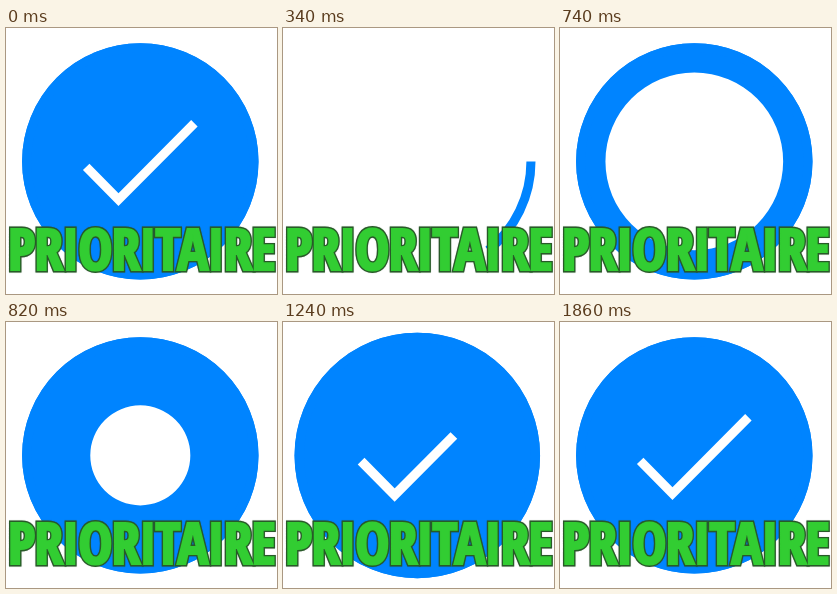
Animation of 271x266 px, one loop 1880 ms. Source, as an HTML page with a canvas:

```html
<!DOCTYPE html>
<html lang="fr">
<head>
<meta charset="utf-8">
<title>Prioritaire</title>
<style>
  html, body { margin: 0; width: 100%; height: 100%; overflow: hidden; background: #fff; }
  canvas { display: block; }
</style>
</head>
<body>
<canvas id="stage" width="271" height="266" role="img" aria-label="PRIORITAIRE"></canvas>
<script>
const ctx = document.getElementById('stage').getContext('2d');
const LOOP = 1880, STEP = 20;
const CX = 134.3, CY = 133.4, R = 118.2;
const UNIT = R / 26;               // the badge is laid out on a 52-unit square
const BLUE = '#0084ff', GREEN = '#32cd32', EDGE = '#285a28';
const LABEL = 'PRIORITAIRE';
const LABEL_W = 262.5, LABEL_H = 41.5, LABEL_X = 136.5, LABEL_Y = 221;

const clamp = (v, lo, hi) => Math.min(hi, Math.max(lo, v));

function bezier(x1, x2) {          // cubic-bezier(x1, 0, x2, 1)
  return x => {
    if (x <= 0) return 0;
    if (x >= 1) return 1;
    let lo = 0, hi = 1, u = 0.5;
    for (let i = 0; i < 30; i++) {
      u = (lo + hi) / 2;
      const v = 1 - u;
      if (3 * v * v * u * x1 + 3 * v * u * u * x2 + u * u * u < x) lo = u;
      else hi = u;
    }
    return u * u * (3 - 2 * u);
  };
}
const drawEase = bezier(0.65, 0.45);
const inOut = bezier(0.42, 0.58);
const span = (t, start, length) => clamp((t - start) / length, 0, 1);

// Pick the heavy condensed face whose proportions suit the label best.
function pickLabel() {
  const families = ['Impact', 'Noto Sans ExtraCondensed', 'Noto Sans', 'Open Sans Condensed',
    'Open Sans', 'Roboto Condensed', 'Roboto', 'Liberation Sans Narrow', 'DejaVu Sans Condensed', 'Lato'];
  const goal = LABEL_W / LABEL_H;
  let best = null;
  for (const family of families) {
    for (const width of ['ultra-condensed', 'extra-condensed', 'condensed']) {
      const face = size => `900 ${width} ${size}px "${family}", sans-serif`;
      ctx.font = face(100);
      const m = ctx.measureText(LABEL);
      const ink = m.actualBoundingBoxLeft + m.actualBoundingBoxRight;
      const cap = ctx.measureText('E').actualBoundingBoxAscent;
      const miss = Math.abs(ink / cap - goal);
      if (!best || miss < best.miss) best = { face, ink, cap, miss };
    }
  }
  const gaps = LABEL.length - 1;
  let size = LABEL_H / best.cap * 100;
  const natural = best.ink * size / 100;
  let track = clamp((LABEL_W - natural) / gaps, -2.2, 3);
  const shrink = Math.min(1, LABEL_W / (natural + gaps * track));
  size *= shrink;
  track *= shrink;
  return { font: best.face(size), track: track + 'px', cap: best.cap * size / 100 };
}
const label = pickLabel();

function drawLabel() {
  ctx.save();
  ctx.font = label.font;
  ctx.letterSpacing = label.track;
  const m = ctx.measureText(LABEL);
  const x = LABEL_X - (m.actualBoundingBoxRight - m.actualBoundingBoxLeft) / 2;
  const y = LABEL_Y + label.cap / 2;
  const outline = (color, width) => {
    ctx.strokeStyle = color;
    ctx.lineWidth = width;
    ctx.strokeText(LABEL, x, y);
  };
  ctx.miterLimit = 2;
  ctx.shadowColor = 'rgba(20, 50, 20, 0.4)';
  ctx.shadowBlur = 1;
  outline(EDGE, 4.8);
  ctx.shadowColor = 'transparent';
  outline(GREEN, 2.2);
  ctx.fillStyle = GREEN;
  ctx.fillText(LABEL, x, y);
  ctx.restore();
}

function drawRing(p) {
  if (p <= 0) return;
  ctx.beginPath();
  ctx.arc(0, 0, 25, 0, Math.min(1, p * 1.07) * Math.PI * 2);
  ctx.strokeStyle = BLUE;
  ctx.stroke();
}

function drawFill(p) {
  if (p <= 0) return;
  const hole = Math.max(0, 26 * (1 - p * 30 / 28));
  ctx.beginPath();
  ctx.arc(0, 0, 26, 0, Math.PI * 2);
  if (hole) {
    ctx.moveTo(hole, 0);
    ctx.arc(0, 0, hole, 0, Math.PI * 2, true);
  }
  ctx.fillStyle = BLUE;
  ctx.fill();
}

function drawTick(p) {
  if (p <= 0) return;
  ctx.beginPath();
  ctx.moveTo(-11.9, 1.2);
  ctx.lineTo(-4.8, 8.4);
  ctx.lineTo(11.9, -8.4);
  ctx.setLineDash([48 * p, 100]);
  ctx.strokeStyle = '#fff';
  ctx.stroke();
  ctx.setLineDash([]);
}

function render(ms) {
  // The finished badge shows for one step, then the stage clears.
  const t = ms < STEP ? 1500 : 0.85 * ms - 89;
  const pulse = span(t, 900, 300) * 2;
  const zoom = 1 + 0.1 * (pulse < 1 ? inOut(pulse) : 1 - inOut(pulse - 1));

  ctx.fillStyle = '#fff';
  ctx.fillRect(0, 0, 271, 266);
  ctx.save();
  ctx.translate(CX, CY);
  ctx.scale(UNIT * zoom, UNIT * zoom);
  ctx.lineWidth = 2;
  drawFill(inOut(span(t, 420, 360)));
  drawRing(drawEase(span(t, 10, 572)));
  drawTick(drawEase(span(t, 794, 300)));
  ctx.restore();
  drawLabel();
}

const begin = performance.now();
function tick() {
  const ms = (performance.now() - begin) % LOOP;
  render(Math.floor(ms / STEP) * STEP);
  requestAnimationFrame(tick);
}
tick();
</script>
</body>
</html>
```
